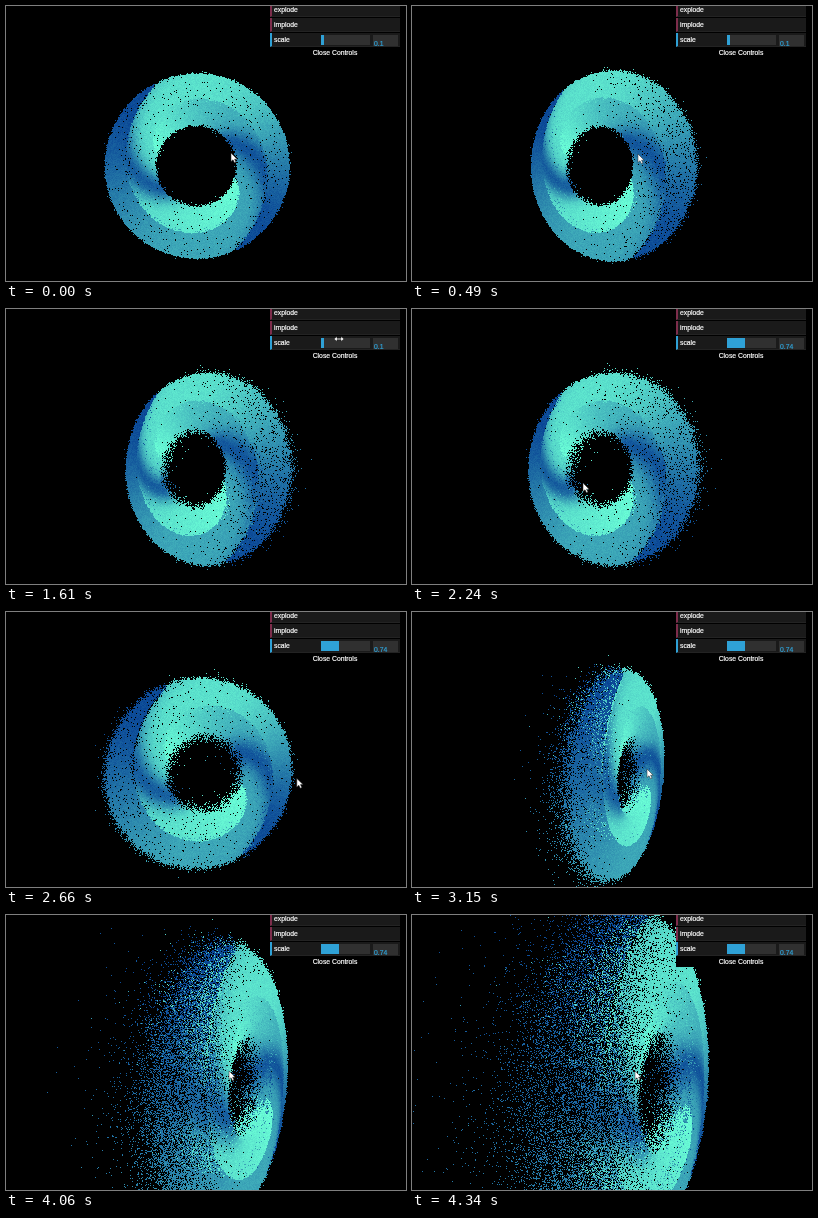
Animation of 400x275 px, one loop 4410 ms. Source, as an HTML page with a canvas:

```html
<!DOCTYPE html>
<html lang="en">
<head>
<meta charset="utf-8">
<title>Particle ring</title>
<style>
  html, body { margin: 0; width: 100%; height: 100%; overflow: hidden; background: #000; }
  canvas { position: absolute; left: 0; top: 0; }
  #gui {
    position: absolute; left: 264px; top: 0; width: 130px; height: 52px;
    background: #000; color: #fff; font: 6.8px/14px "Liberation Sans", Arial, sans-serif;
    -webkit-text-stroke: .2px;
  }
  .row {
    position: absolute; left: 0; width: 130px; height: 14px; box-sizing: border-box;
    padding-left: 2px; background: #1a1a1a; border-left: 2px solid #7d2d4b;
    border-bottom: 1px solid #232323;
  }
  .row.hover { background: #101010; }
  .row.num { border-left-color: #2fa1d6; }
  #track { position: absolute; left: 49px; top: 2px; width: 49px; height: 10px; background: #303030; }
  #fill { height: 100%; background: #2fa1d6; }
  #value {
    position: absolute; left: 101px; top: 2px; width: 24px; height: 11px; padding-left: 1px;
    background: #303030; color: #2fa1d6; line-height: 17px; overflow: hidden;
  }
  #close { position: absolute; top: 41px; width: 130px; height: 11px; line-height: 11px; text-align: center; }
  #cursor { position: absolute; left: 0; top: 0; overflow: visible; }
</style>
</head>
<body>
<canvas id="stage" width="400" height="275"></canvas>
<div id="gui">
  <div class="row" id="explode" style="top:-3px">explode</div>
  <div class="row" style="top:12px">implode</div>
  <div class="row num" style="top:27px">scale
    <div id="track"><div id="fill"></div></div>
    <div id="value"></div>
  </div>
  <div id="close">Close Controls</div>
</div>
<svg id="cursor" width="10" height="12">
  <path id="arrow" d="M0 0V8.5L2 6.8L3.5 9.8L5 9.1L3.6 6.2H6.2Z" fill="#fff" stroke="#222" stroke-width=".5"/>
  <path id="resize" d="M-5 0L-2 -2.5V-.7H2V-2.5L5 0L2 2.5V.7H-2V2.5Z" fill="#fff" stroke="#111" stroke-width=".5"/>
</svg>
<script>
const W = 400, H = 275, LOOP = 4410, STEP = 70, COUNT = 80000;
const RING = 67, TUBE = 25, DEPTH = 5, FOCAL = 220, RAD = Math.PI / 180;
const DARK = [10, 70, 150], LIGHT = [105, 252, 214];
const $ = id => document.getElementById(id);

// Pointer stops: time, x, y
const STOPS = [
  [0, 225, 147], [560, 226, 148], [1050, 301, 0], [1610, 333, 30], [1750, 334, 30],
  [2240, 171, 174], [2800, 313, 165], [3150, 235, 157], [3710, 223, 156]
];

// Eased progress from 0 to 1 between two times
function ramp(t, from, to) {
  const u = Math.min(1, Math.max(0, (t - from) / (to - from)));
  return u * u * (3 - 2 * u);
}

const bump = (x, width) => Math.exp(-((x / width) ** 2));

let seed = 20177;
function random() {
  seed = (seed + 0x6D2B79F5) | 0;
  let t = Math.imul(seed ^ (seed >>> 15), 1 | seed);
  t = (t + Math.imul(t ^ (t >>> 7), 61 | t)) ^ t;
  return ((t ^ (t >>> 14)) >>> 0) / 4294967296;
}

// Each strand winds from the inner rim to the outer one; s is degrees along it
const edgeAt = s => ((s - 122) / 115) ** 3;

function strandShade(strand, s, across) {
  const level = strand ? .85 : .53;
  const glow = level + (1 - level) * bump(s, 80);
  const dip = 1 - .85 * bump(s - 172 - 35 * across, 24);
  return glow * dip * (1 - .95 * ramp(s, 270, 395));
}

// Brightness of the surface, or -1 in the gap between strands
function shadeAt(angle, across) {
  let s = (530 - angle) % 360, strand = 0;
  if (s >= 180) { s -= 180; strand = 1; }
  for (let turn = 0; turn < 2; turn++) {
    const gap = across - edgeAt(s);
    if (gap < 0) break;
    if (gap < .07 && s > 155) return -1;
    s += 180;
    strand = 1 - strand;
  }
  return strandShade(strand, s, across);
}

const px = new Float32Array(COUNT), py = new Float32Array(COUNT), pz = new Float32Array(COUNT);
const dx = new Float32Array(COUNT), dy = new Float32Array(COUNT), dz = new Float32Array(COUNT);
const ink = new Uint32Array(COUNT);

for (let i = 0; i < COUNT;) {
  const angle = random() * 360, across = random() * 2 - 1;
  const front = Math.sqrt(1 - across * across) * (random() < .5 ? -1 : 1);
  const radius = RING + TUBE * across;
  if (random() > radius / (RING + TUBE)) continue;
  const shade = shadeAt(angle, across);
  if (shade === -1) continue;
  const c = Math.cos(angle * RAD), s = Math.sin(angle * RAD);
  const push = -Math.log(1 - random()) * (.08 + .6 * (1 - front));
  px[i] = radius * c;
  py[i] = radius * s;
  pz[i] = DEPTH * front;
  dx[i] = push * across * c;
  dy[i] = push * across * s;
  dz[i] = push * (front - .5);
  const tone = shade + (random() - .5) * .1;
  const [r, g, b] = DARK.map((v, k) => Math.min(255, v + (LIGHT[k] - v) * tone));
  ink[i] = (255 << 24 | b << 16 | g << 8 | r) >>> 0;
  i++;
}

const ctx = $("stage").getContext("2d");
const image = ctx.createImageData(W, H);
const pixels = new Uint32Array(image.data.buffer);
const near = new Float32Array(W * H);

function drawRing(time) {
  const turn = ramp(time, 0, 560), swing = ramp(time, 2240, 3150);
  const drift = ramp(time, 3150, 3710), zoom = ramp(time, 3640, 4410);
  const yaw = (2 + 32 * turn - 3 * ramp(time, 1750, 2240) - 98 * swing) * RAD;
  const cx = 190 - 7 * turn + 40 * swing + 9 * drift + 26 * zoom;
  const cy = 160 + 3 * swing + 2 * drift + 10 * zoom;
  const dist = 221 - 4 * swing - 10 * drift - 66 * zoom;
  const scatter = 1 + time * .0009;
  const lean = .07 * swing;
  const c = Math.cos(yaw), s = Math.sin(yaw);
  pixels.fill(0xff000000);
  near.fill(0);
  for (let i = 0; i < COUNT; i++) {
    const x = px[i] + dx[i] * scatter, y = py[i] + dy[i] * scatter, z = pz[i] + dz[i] * scatter;
    const gap = dist - x * s - z * c;
    if (gap < 8) continue;
    const k = FOCAL / gap;
    const sx = Math.floor(cx + (x * c - z * s + lean * y) * k), sy = Math.floor(cy - y * k);
    if (sx < 0 || sy < 0 || sx >= W || sy >= H) continue;
    const at = sy * W + sx;
    if (k > near[at]) {
      near[at] = k;
      pixels[at] = ink[i];
    }
  }
  ctx.putImageData(image, 0, 0);
}

function pointerAt(time) {
  let [, x, y] = STOPS[0];
  for (let i = 1; i < STOPS.length; i++) {
    const u = ramp(time, STOPS[i - 1][0], STOPS[i][0]);
    x += (STOPS[i][1] - x) * u;
    y += (STOPS[i][2] - y) * u;
  }
  return [x, y];
}

function drawControls(time) {
  const [x, y] = pointerAt(time);
  const sliding = time >= 1540 && time <= 1750;
  $("cursor").style.transform = `translate(${x}px, ${y}px)`;
  $("arrow").style.display = sliding ? "none" : "";
  $("resize").style.display = sliding ? "" : "none";
  $("explode").classList.toggle("hover", time >= 980 && time <= 1260);
  const scaled = time >= 1680;
  $("fill").style.width = scaled ? "18px" : "3px";
  $("value").textContent = scaled ? "0.74" : "0.1";
}

let shown = -1;
const start = performance.now();
function tick() {
  const time = Math.floor((performance.now() - start) % LOOP / STEP) * STEP;
  if (time !== shown) {
    shown = time;
    drawRing(time);
    drawControls(time);
  }
  requestAnimationFrame(tick);
}
tick();
</script>
</body>
</html>
```
